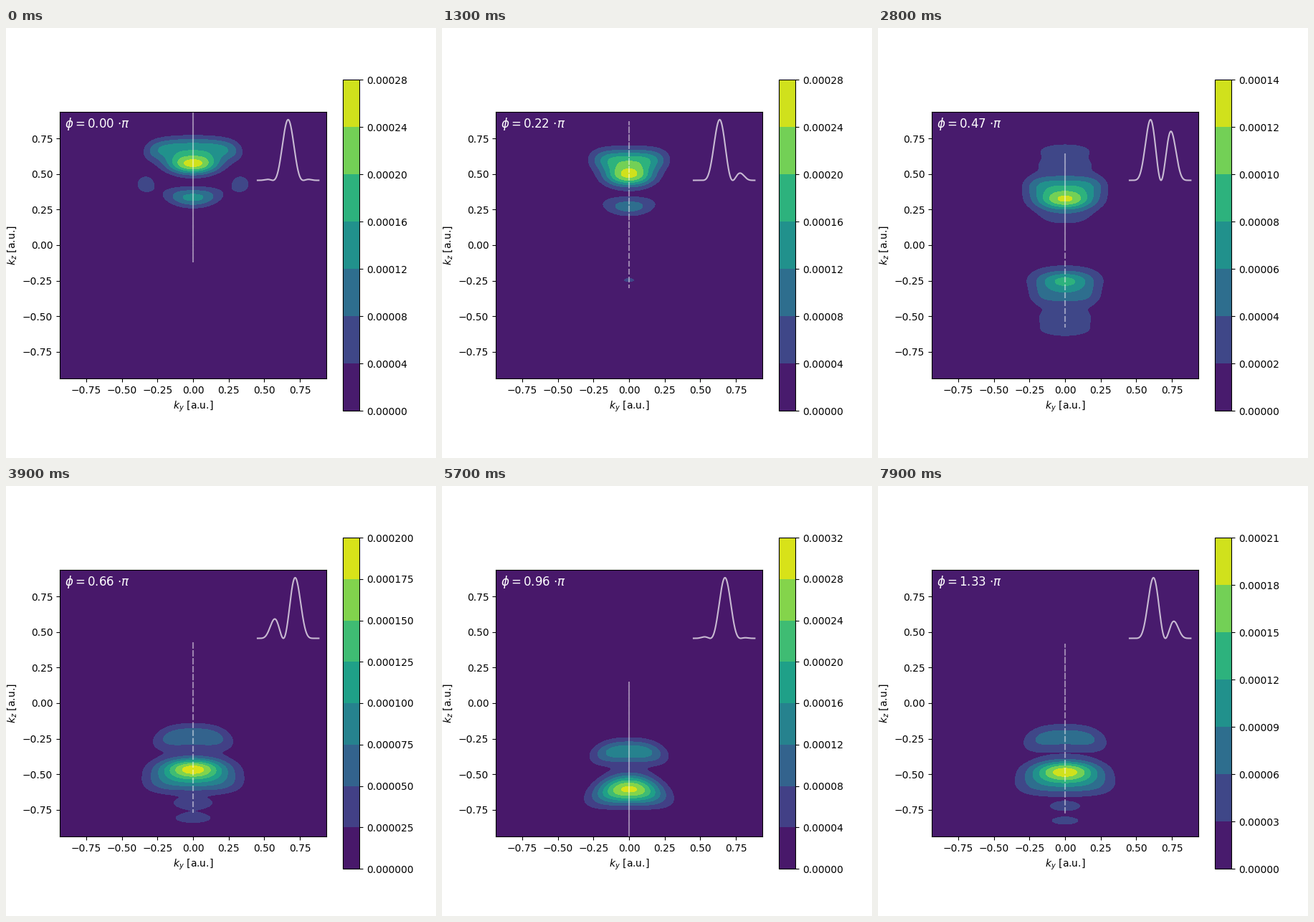
Animation, 600 px wide and 600 px high, one loop 8000 ms. Source, as a matplotlib script:

```python
import numpy as np
import matplotlib.pyplot as plt
from matplotlib.animation import FuncAnimation

FRAMES, STEPS = 80, 119
A0 = 0.9365  # peak vector potential, also the axis limit

grid = np.linspace(-A0, A0, 251)
KY, KZ = np.meshgrid(grid, grid)
AY = np.abs(KY)


def keys(u, *points):
    return np.interp(u, *zip(*points))


def lobe(kz, height, z, sz, sy, power=2, bend=0):
    """Bell of the given widths whose ridge z bends with ky."""
    return height * np.exp(-(AY / sy) ** power - ((kz - z - bend * KY**2) / sz) ** 2)


def one_side(u, kz):
    """Yield towards positive kz at phase u (in units of pi)."""
    # slow lobe, breathing with the phase
    wave = np.cos(2 * np.pi * (u - 0.09) / 0.22)
    height = keys(u, (0, 13.5), (0.11, 18), (0.22, 10), (0.34, 7.5), (0.47, 2.6), (0.66, 0))
    z = keys(u, (0, 0.335), (0.11, 0.343), (0.22, 0.27), (0.53, 0.18))
    total = lobe(kz, height, z, 0.08 + 0.015 * wave, 0.24 + 0.06 * wave, 3 + wave, 0.45)

    # bright lobe of the single-peak pulse
    height = keys(u, (0, 25), (0.04, 29), (0.11, 33), (0.22, 23.5), (0.32, 0))
    z = keys(u, (0, 0.57), (0.04, 0.605), (0.11, 0.605), (0.34, 0.36))
    sz = keys(u, (0, 0.072), (0.04, 0.1), (0.22, 0.077))
    sy = keys(u, (0, 0.185), (0.04, 0.23), (0.11, 0.227), (0.22, 0.17))
    bend = keys(u, (0, 0.2), (0.04, 0.65), (0.15, 0))
    total += lobe(kz, height, z, sz, sy, 2.2, bend)

    # fringes at fixed spacings behind a falling front
    front = 0.847 - 1.13 * u
    late = max(0, u - 0.33)
    height = keys(u, (0.1, 0), (0.22, 16), (0.27, 20.5), (0.33, 18.2), (0.47, 10.6),
                  (0.53, 6.6), (0.66, 1.5), (0.78, 4.3), (0.9, 0))
    total += lobe(kz, height, max(front, 0.245), 0.075 - 0.06 * late,
                  0.31 - 0.23 * u, keys(u, (0.2, 4), (0.33, 2)))
    height = keys(u, (0.2, 0), (0.33, 7), (0.47, 7), (0.66, 0))
    total += lobe(kz, height, front + 0.1, 0.082, 0.35 - 0.5 * late, 4)
    height = keys(u, (0.2, 0), (0.33, 4), (0.54, 2.5), (0.66, 0))
    for gap in (0.25, 0.35):
        total += lobe(kz, height, front + gap, 0.045 + 0.12 * late, 0.17 + 0.5 * late)

    # wing and side spots that fade right after u = 0
    fade = max(0, 1 - u / 0.042)
    total += lobe(kz, 13 * fade, 0.69, 0.075, 0.333, 6, -0.25)
    total += 6 * fade * np.exp(-((AY - 0.335) / 0.079) ** 2 - ((kz - 0.43) / 0.074) ** 2)
    return total


def density(phi):
    u = phi if phi <= 1 else 2 - phi
    return 1e-5 * (one_side(u, KZ) + one_side(1 - u, -KZ) + 1e-4)


fig = plt.figure(figsize=(6, 6), dpi=100, facecolor="white")
ax = fig.add_axes([0.125, 0.185, 0.62, 0.62])
ax.set(xlim=(-A0, A0), ylim=(-A0, A0),
       xlabel="$k_y$ [a.u.]", ylabel="$k_z$ [a.u.]")
ticks = np.arange(-3, 4) * 0.25
ax.set_xticks(ticks)
ax.set_yticks(ticks)
ax.autoscale(False)

t = np.linspace(-0.5, 0.5, 500)
drift, = ax.plot([], [], "--", color="white", alpha=0.45, lw=1.5)
pulse, = ax.plot([], [], color="white", alpha=0.7, lw=1.5)
label = ax.text(-0.9, 0.825, "", color="white", fontsize=12)


def draw(i):
    phi = 2 * i / STEPS
    for old in list(ax.collections) + fig.axes[1:]:
        old.remove()

    filled = ax.contourf(KY, KZ, density(phi))
    cax = fig.add_axes([0.78375, 0.11, 0.0385, 0.77])
    fig.colorbar(filled, cax=cax)

    field = np.cos(np.pi * t) ** 2 * np.cos(2 * np.pi * t + np.pi * phi)
    drift.set_data(0 * t, A0 * field)
    power = field**2 / np.max(field**2)
    pulse.set_data(0.668 + 0.43 * t, 0.4555 + 0.426 * power)
    label.set_text(rf"$\phi = {phi:.2f}$ $\cdot \pi$")
    return drift, pulse, label


anim = FuncAnimation(fig, draw, frames=FRAMES, interval=100, repeat=True, blit=False)
plt.show()
```
